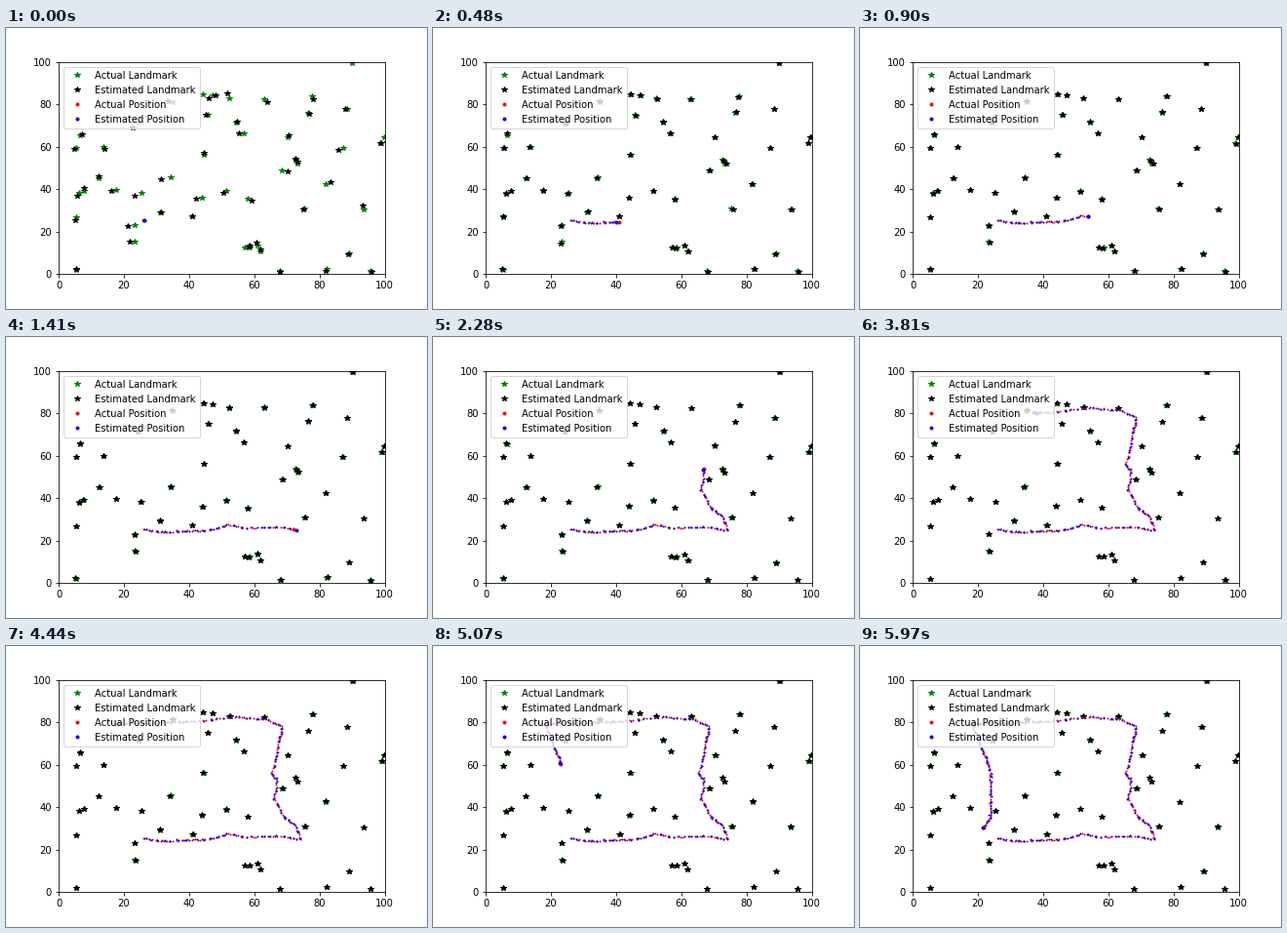
A matplotlib script for the animation above (6 s loop, 432 px wide and 288 px high).

```python
import numpy as np
import matplotlib.pyplot as plt
from matplotlib.animation import FuncAnimation

FRAMES, STEP_MS = 200, 30
rng = np.random.default_rng(7)

# Landmark map as x, y pairs
marks = np.array([
    5.4, 2, 5.4, 26.5, 6.3, 38, 7.8, 39, 5.3, 59.5, 6.7, 65.5, 13.8, 60,
    12.3, 45.2, 17.7, 39.6, 25.5, 38.2, 23.3, 23, 23.4, 15, 31.2, 29.2,
    34.2, 45.3, 41, 27.2, 44, 36.1, 51.5, 39, 57.8, 35.4, 44.4, 56.2,
    45.7, 75.1, 54.5, 71.5, 56.7, 66.3, 44.3, 84.7, 47.2, 84.2, 52.3, 82.8,
    63, 82.5, 70.3, 64.5, 72.7, 53.7, 73.2, 52.1, 68.4, 48.9, 76.4, 76,
    77.8, 83.8, 88.5, 77.8, 90, 99.2, 87.2, 59.2, 99.8, 64.5, 99, 61.7,
    81.9, 42.5, 75.4, 30.9, 93.5, 30.5, 89.1, 9.6, 95.5, 1.2, 82, 2.5,
    67.9, 1.3, 57.1, 12.5, 58.4, 12.2, 61, 13.4, 61.9, 10.6, 34.8, 81,
    24.5, 71.5]).reshape(-1, 2)

# Each landmark estimate is the running mean of noisy readings.
readings = marks + rng.normal(0, 1.15, (FRAMES, *marks.shape))
count = np.arange(1, FRAMES + 1)[:, None, None]
est_marks = np.cumsum(readings, axis=0) / count

# Bends of the robot's route: step, x, y
bends = np.array([
    (0, 26, 25.5), (6, 31.5, 24), (23, 47, 25), (28, 52, 27.6),
    (33, 56.5, 26), (43, 68, 26.3), (49, 74, 24.8), (55, 72.5, 31.3),
    (61, 69, 35.4), (69, 66, 44.2), (76, 67, 53.3), (79, 65.3, 55.7),
    (85, 66.6, 63.9), (98, 68.5, 78.2), (104, 63.3, 81.6), (112, 54, 82.6),
    (122, 42, 80.3), (148, 18, 79.3), (172, 23.9, 57.5), (192, 23.8, 35),
    (199, 21.7, 30.5)])


def follow(lag, spread):
    """Route positions with jitter along the way (steps) and around it."""
    t = np.arange(FRAMES) + rng.normal(0, lag, FRAMES)
    xy = [np.interp(t, bends[:, 0], bends[:, k]) for k in (1, 2)]
    return np.column_stack(xy) + rng.normal(0, spread, (FRAMES, 2))


pos = follow(0.2, 0.12)
est_pos = follow(0.5, 0.2)

plt.rcParams.update({"font.family": "DejaVu Sans", "font.size": 10})
fig, ax = plt.subplots(figsize=(6, 4), dpi=72)
fig.subplots_adjust(left=0.125, right=0.9, bottom=0.125, top=0.88)
ax.set(xlim=(0, 100), ylim=(0, 100))

ax.plot(*marks.T, "g*", label="Actual Landmark")
est_stars, = ax.plot([], [], "k*", label="Estimated Landmark")
trail, = ax.plot([], [], "r.", markersize=2)
est_trail, = ax.plot([], [], "b.", markersize=2)
dot, = ax.plot([], [], "r.", label="Actual Position")
est_dot, = ax.plot([], [], "b.", label="Estimated Position")
ax.legend(loc="upper left")


def update(n):
    est_stars.set_data(*est_marks[n].T)
    for line, path in ((trail, pos), (est_trail, est_pos)):
        line.set_data(*path[:n + 1].T)
    for line, path in ((dot, pos), (est_dot, est_pos)):
        line.set_data(*path[n:n + 1].T)
    return est_stars, trail, est_trail, dot, est_dot


anim = FuncAnimation(fig, update, frames=FRAMES, interval=STEP_MS,
                     init_func=lambda: update(0), repeat=True, repeat_delay=0)
plt.show()
```
